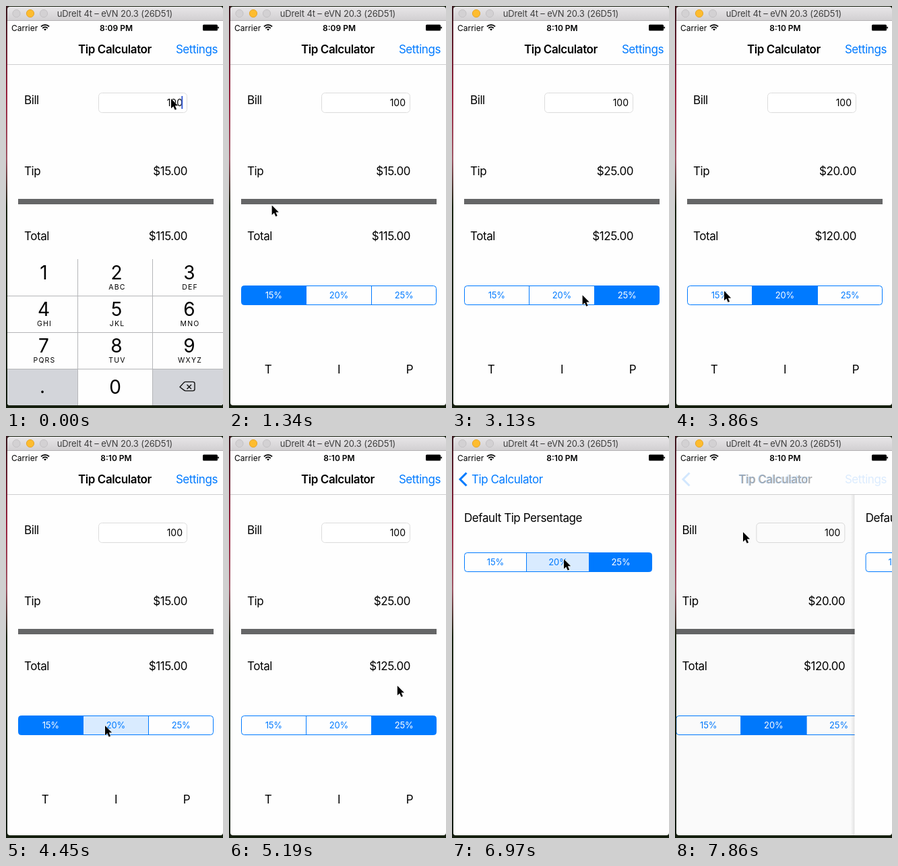
These frames come from a looping animation (322 px wide and 594 px high, 8000 ms). An HTML page:

```html
<!DOCTYPE html>
<html lang="en">
<head>
<meta charset="utf-8">
<title>Tip Calculator</title>
<style>
html, body { margin: 0; width: 100%; height: 100%; overflow: hidden; background: #16200f; }
svg { display: block; width: 322px; height: 594px; }
text { font-family: Inter, Roboto, sans-serif; font-size: 17px; letter-spacing: -.025em; fill: #000; }
text.small { font-size: 12px; letter-spacing: 0; }
text.seg { font-size: 13px; letter-spacing: -.01em; }
text.field { font-size: 14px; letter-spacing: 0; }
text.digit { font-size: 28px; letter-spacing: 0; }
text.letters { font-size: 10.5px; letter-spacing: 1.2px; }
text.window { font-size: 13px; letter-spacing: -.01em; fill: #3e3e3e; }
text.bold { font-weight: 600; }
</style>
</head>
<body>
<svg viewBox="0 0 322 594">
  <defs>
    <linearGradient id="desk" x2="0" y2="1">
      <stop offset="0" stop-color="#3a1a20"/><stop offset=".22" stop-color="#9a2440"/>
      <stop offset=".38" stop-color="#a05a68"/><stop offset=".5" stop-color="#1c2614"/>
      <stop offset="1" stop-color="#141d10"/>
    </linearGradient>
    <linearGradient id="chrome" x2="0" y2="1">
      <stop offset="0" stop-color="#e8e6e8"/><stop offset="1" stop-color="#d1cfd1"/>
    </linearGradient>
    <linearGradient id="shade">
      <stop offset="0" stop-color="#000" stop-opacity="0"/><stop offset="1" stop-color="#000" stop-opacity=".1"/>
    </linearGradient>
    <clipPath id="frame"><rect x="2" y="1" width="320" height="589" rx="4"/></clipPath>
  </defs>
  <rect width="322" height="594" fill="#16200f"/>
  <rect width="3" height="594" fill="url(#desk)"/>
  <g id="stage" clip-path="url(#frame)"></g>
</svg>
<script>
const DURATION = 8000, STEPS = 54;
const BLUE = '#007aff', PAPER = '#fefefe', LINE = '#b5b6b9';
const KEYBOARD_HIDE = 6, CLOCK_TURN = 18, OPEN_SETTINGS = 40, GO_BACK = 51.2;
const stage = document.getElementById('stage');

// Where the pointer stops; a stop with a tip presses that segment
const stops = [
  { at: -1, x: 245, y: 137 },
  { at: 4, x: 14, y: 222 },
  { at: KEYBOARD_HIDE, x: 14, y: 222 },
  { at: 12, x: 155, y: 428, tip: 20 },
  { at: 18, x: 261, y: 428, tip: 25 },
  { at: 22, x: 170, y: 427, tip: 20 },
  { at: 27, x: 55, y: 420, tip: 15 },
  { at: 30, x: 147, y: 428, tip: 20 },
  { at: 33, x: 245, y: 428, tip: 25 },
  { at: 38, x: 276, y: 50 },
  { at: OPEN_SETTINGS, x: 276, y: 50 },
  { at: 45, x: 166, y: 182 },
  { at: 47, x: 166, y: 182, tip: 20 },
  { at: 51, x: 68, y: 62 },
  { at: 53, x: 101, y: 142 }
];

const clamp = v => Math.max(0, Math.min(1, v));
const smooth = v => clamp(v) ** 2 * (3 - 2 * clamp(v));
const spring = steps => {
  const v = 1.77 * Math.max(0, steps);
  return 1 - (1 + v) * Math.exp(-v);
};

function pointerAt(n) {
  const i = stops.findIndex(s => s.at >= n), a = stops[i - 1], b = stops[i];
  const u = smooth((n - a.at - 1) / (b.at - a.at - 1));
  return [a.x + (b.x - a.x) * u, a.y + (b.y - a.y) * u];
}

const selectedAt = n => stops.reduce((tip, s) => s.tip && s.at < n ? s.tip : tip, 15);
const pressedAt = n => stops.find(s => s.tip && s.at === n)?.tip;

const rect = (x, y, w, h, fill, more = '') =>
  `<rect x="${x}" y="${y}" width="${w}" height="${h}" fill="${fill}" ${more}/>`;
const text = (x, y, s, { anchor = 'start', cls = '', fill = '', opacity = 1 } = {}) =>
  `<text x="${x}" y="${y}" text-anchor="${anchor}" class="${cls}" opacity="${opacity}"` +
  `${fill && ` style="fill:${fill}"`}>${s}</text>`;
const path = (d, more = '') => `<path d="${d}" ${more}/>`;
const shift = (x, y, body) => `<g transform="translate(${x} ${y})">${body}</g>`;

function segments(x, y, w, selected, pressed) {
  const part = w / 3;
  let out = '';
  [15, 20, 25].forEach((tip, i) => {
    const left = x + i * part, divider = Math.ceil(left) - 1, on = tip === selected;
    if (on || tip === pressed) {
      const start = i ? divider : x + .5, end = i < 2 ? Math.ceil(left + part) : x + w - .5;
      out += rect(start, y + .5, end - start, 28, on ? BLUE : '#d9ebff', i === 1 ? '' : 'rx="3.5"');
      if (on && i !== 1) out += rect(i ? start : end - 6, y + .5, 6, 28, BLUE);
    }
    if (i) out += rect(divider, y, 1, 29, BLUE);
    out += text(left + part / 2, y + 19, tip + '%', { anchor: 'middle', cls: 'seg', fill: on ? '#fff' : BLUE });
  });
  return out + rect(x + .5, y + .5, w - 1, 28, 'none', `rx="4" stroke="${BLUE}"`);
}

function homePage(n, tip, pressed) {
  const end = { anchor: 'end' };
  let out = rect(2, 86, 320, 504, PAPER) +
    text(27, 145, 'Bill') + text(27, 250, 'Tip') + text(27, 346, 'Total') +
    rect(137.5, 128.5, 131, 29, '#fff', 'rx="5" stroke="#dcdcdc"') +
    text(262, 148, '100', { anchor: 'end', cls: 'field' }) +
    text(269, 250, `$${tip}.00`, end) + text(269, 346, `$${100 + tip}.00`, end) +
    rect(18, 285, 290, 8, '#656667') +
    segments(18, 413, 290, tip, pressed);
  if (n < 3) out += rect(260.3, 133, 2, 19, '#3f63d6');
  if (n < GO_BACK)
    [...'TIP'].forEach((c, i) => out += text(58 + 105 * i, 542.5, c, { anchor: 'middle' }));
  return out;
}

const settingsPage = (tip, pressed) =>
  rect(-4, 86, 6, 504, 'url(#shade)') + rect(2, 86, 320, 504, PAPER) +
  text(18, 127, 'Default Tip Persentage') + segments(18, 172, 279, tip, pressed);

function keyboard() {
  const letters = ['', 'ABC', 'DEF', 'GHI', 'JKL', 'MNO', 'PQRS', 'TUV', 'WXYZ'];
  const mid = cls => ({ anchor: 'middle', cls });
  let out = rect(2, 374, 320, 216, PAPER) +
    rect(2, 537, 105, 53, '#d3d5da') + rect(218, 537, 104, 53, '#d3d5da');
  letters.forEach((s, i) => {
    const x = 56 + 108 * (i % 3), y = 404 + 54 * Math.floor(i / 3);
    out += text(x, y, i + 1, mid('digit')) + text(x + 1, y + 15, s, mid('letters'));
  });
  for (const y of [428, 482, 536]) out += rect(2, y, 320, 1, LINE);
  for (const x of [106, 217]) out += rect(x, 374, 1, 216, LINE);
  return out + text(54, 572, '.', mid('digit')) + text(162, 573, '0', mid('digit')) +
    path('M258 563l6-6.6q1-1 2.4-1h11q2.6 0 2.6 2.6v8q0 2.6-2.6 2.6h-11q-1.4 0-2.4-1z' +
      'M268.5 559.5l6.5 6.5m0-6.5l-6.5 6.5', 'fill="none" stroke="#111" stroke-width="1.4" stroke-linejoin="round"');
}

function navBar(n, push) {
  const popping = n > GO_BACK, home = 1 - push;
  const title = clamp(popping ? (home - .75) * 4 : 1 - 1.25 * push);
  const settings = n === OPEN_SETTINGS ? .3 : clamp(popping ? (home - .8) * 5 : 1 - 1.7 * push);
  const back = popping ? push : clamp((push - .55) * 2.5);
  return rect(2, 22, 320, 64, PAPER) + rect(2, 86, 320, 1, '#cfcfd0') +
    text(107 - 72 * push, 70, 'Tip Calculator', { cls: 'bold', opacity: title }) +
    text(107 - 78 * push, 70, 'Tip Calculator', { fill: BLUE, opacity: back }) +
    path('M21.5 54.5L12 64l9.5 9.5', `fill="none" stroke="${BLUE}" stroke-width="3" opacity="${back}"`) +
    text(314, 70, 'Settings', { anchor: 'end', fill: BLUE, opacity: settings });
}

function statusBar(n) {
  const arc = r => `M${58 - r * .72} ${36.5 - r * .72}A${r} ${r} 0 0 1 ${58 + r * .72} ${36.5 - r * .72}`;
  return text(8, 36.5, 'Carrier', { cls: 'small' }) +
    path(arc(8.4) + arc(5.2), 'fill="none" stroke="#000" stroke-width="1.8"') +
    path('M58 36.5l-2-2.2a3 3 0 0 1 4 0z') +
    text(163.5, 36.5, n < CLOCK_TURN ? '8:09 PM' : '8:10 PM', { anchor: 'middle', cls: 'small bold' }) +
    rect(292, 27.5, 22, 9, '#000', 'rx="1.5"') + rect(314.3, 30.5, 1.6, 3, '#000', 'rx=".8"');
}

function titleBar() {
  const light = (x, fill, stroke) => `<circle cx="${x}" cy="11" r="5.6" fill="${fill}" stroke="${stroke}"/>`;
  return rect(2, 1, 320, 21, 'url(#chrome)') + rect(2, 21, 320, 1, '#b4b2b4') +
    light(15.5, '#d3d1d3', '#c3c1c3') + light(36, '#fdbc2f', '#e5a52a') + light(56, '#d3d1d3', '#c3c1c3') +
    text(161.5, 16, 'uDrelt 4t – eVN 20.3 (26D51)', { anchor: 'middle', cls: 'window' });
}

const arrow = path('M0 0V14.2L3.3 11.2L5.7 16.6L8.1 15.6L5.8 10.3H10.2Z',
  'stroke="#fff" paint-order="stroke"');

function render(n) {
  const tip = selectedAt(n), pressed = pressedAt(n);
  const push = spring(n - OPEN_SETTINGS) - spring(n - GO_BACK);
  const drop = 216 * smooth((n - KEYBOARD_HIDE) / 3);
  let out = shift(-96 * push, 0, homePage(n, tip, pressed));
  if (push > 0) {
    out += rect(2, 86, 320, 504, '#000', `opacity="${.1 * push}"`) +
      shift(320 * (1 - push), 0, settingsPage(tip, pressed));
  }
  if (drop < 216) out += shift(0, drop, keyboard());
  stage.innerHTML = out + navBar(n, push) + statusBar(n) + titleBar() + shift(...pointerAt(n), arrow);
}

// The screen advances in even steps
const start = performance.now();
let shown = -1;
function tick() {
  const t = (performance.now() - start) % DURATION;
  const n = Math.min(STEPS - 1, Math.floor(t / DURATION * STEPS + .03));
  if (n !== shown) render(shown = n);
  requestAnimationFrame(tick);
}
tick();
</script>
</body>
</html>
```
